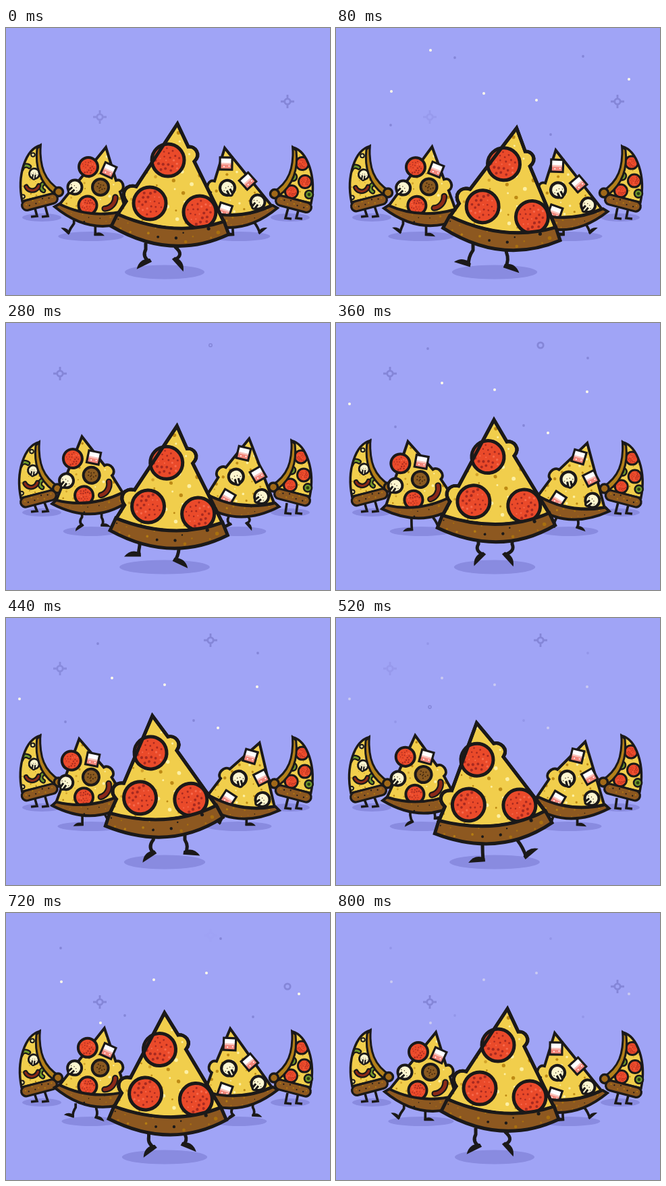
Recreate the animation shown at these times as an HTML page with a canvas. Size 480 by 396 pixels, loop 840 ms.

```html
<!DOCTYPE html>
<html lang="en">
<head>
<meta charset="utf-8">
<title>Pizza dance</title>
<style>
html, body { margin: 0; width: 100%; height: 100%; overflow: hidden; background: #a0a4f6; }
canvas { display: block; width: 480px; height: 396px; }
</style>
</head>
<body>
<canvas id="stage" width="480" height="396"></canvas>
<script>
const c = document.getElementById('stage').getContext('2d');
const LOOP = 840, STEP = 40, DANCE = 800;
const BG = '#a0a4f6', SHADE = '#898be0', INK = '#1b1919', CHEESE = '#f1ce4c', GOLD = '#bd8a14',
  PALE = '#fdf0a4', CRUST = '#8d5820', RED = '#ea4a2a', DARKRED = '#a82a20', CREAM = '#fdf6d0',
  PEPPER = '#8c2a18', GREEN = '#6f9a2c', VIOLET = '#8486d8';

const wave = (p, peak, period = DANCE) => Math.cos((p - peak) / period * 2 * Math.PI);
const dip = p => (1 - wave(p, 0, 400)) / 2;

function group(draw) {
  c.save();
  draw();
  c.restore();
}

function paint(path, fill, line, ink = INK) {
  const args = path ? [path] : [];
  if (fill) { c.fillStyle = fill; c.fill(...args); }
  if (line) { c.strokeStyle = ink; c.lineWidth = line; c.stroke(...args); }
}

function disc(x, y, r, fill, line) {
  c.beginPath();
  c.arc(x, y, r, 0, 7);
  paint(null, fill, line);
}

function shadow(x, y, rx, ry) {
  c.beginPath();
  c.ellipse(x, y, rx, ry, 0, 0, 7);
  paint(null, SHADE);
}

// Scatter dots evenly over a box, clipped to a path.
function speckle(path, seed, n, [x, y, w, h], size, colors) {
  group(() => {
    c.clip(path);
    for (let i = seed; i < seed + n; i++)
      disc(x + w * (i * .7549 % 1), y + h * (i * .5698 % 1),
        size * (.35 + .65 * (i * .377 % 1) ** 2), colors[i % colors.length]);
  });
}

// ---- toppings ----
function salami([x, y], r, line, seed) {
  disc(x, y, r, RED, line);
  for (let i = 0; i < 22; i++) {
    const a = i * 2.4 + seed, d = (r - line) * Math.sqrt((i + .5) / 22);
    disc(x + d * Math.cos(a), y + d * Math.sin(a),
      r * (.045 + .05 * (i * .377 % 1)), i % 4 ? DARKRED : '#f7694c');
  }
}

function meatball([x, y], r) {
  disc(x, y, r, '#8a5a20', 4);
  for (let i = 0; i < 9; i++) {
    const d = 6.5 * Math.sqrt(i / 8);
    disc(x + d * Math.cos(i * 2.4), y + d * Math.sin(i * 2.4), 1.1, '#4a2c10');
  }
}

function ham([x, y], size, deg) {
  group(() => {
    c.translate(x, y);
    c.rotate(deg * Math.PI / 180);
    const s = size / 2;
    c.fillStyle = '#fff';
    c.fillRect(-s, -s, size, size);
    c.fillStyle = '#f2877c';
    c.fillRect(-s, 0, size, s);
    c.fillStyle = '#f9c3bb';
    c.fillRect(-s, -1, size, 2.5);
    disc(-s / 3, s / 2, 1, '#fff');
    disc(s / 2, s / 2.4, 1, '#fff');
    c.strokeStyle = INK;
    c.lineWidth = 3.2;
    c.strokeRect(-s, -s, size, size);
  });
}

const stem = new Path2D('M-2.5 3 L-2.5 11 Q0 13.5 2.5 11 L2.5 3');
function mushroom([x, y], k, deg) {
  group(() => {
    c.translate(x, y);
    c.rotate(deg * Math.PI / 180);
    c.scale(k, k);
    disc(0, 0, 10.5, CREAM, 4);
    paint(stem, CREAM, 3);
    for (let i = 0; i < 4; i++) disc(-6 + i * 4, i % 3 ? -1 : 1.5, .7, '#3c3020');
  });
}

function olive(x, y, r) {
  disc(x, y, r, GREEN, 2.6);
  disc(x, y, r * .4, '#2c3d12');
}

function arcLine([x, y], r, from, to, width, color) {
  c.lineCap = 'round';
  for (const [w, col] of [[width, INK], [width - 4.5, color]]) {
    c.beginPath();
    c.arc(x, y, r, from, to);
    paint(null, null, w, col);
  }
}

// ---- slices ----
const big = {
  cheese: 'M254 142 L270 176 C280 175 290 187 279 198 L323 288 Q248 312 165 277 L178 257 C169 244 178 231 193 235 Z',
  crust: new Path2D('M165 276 Q248 312 323 287 L330 306 Q245 346 156 294 Z'),
  box: [152, 140, 182, 160], base: [152, 278, 182, 48], foot: 302, tall: 160, line: 5
};
const mid = {
  cheese: 'M148 177 L163 226 C173 223 178 238 169 243 L178 272 Q125 284 79 262 Z',
  crust: new Path2D('M79 261 Q125 284 178 271 L182 286 Q125 309 72 265 Z'),
  box: [78, 177, 100, 105], base: [70, 262, 114, 38], foot: 278, tall: 101, line: 4
};

// The slice leans over more and more towards its tip.
const bend = (s, tip) => (x, y) => [x + tip * ((s.foot - y) / s.tall) ** 2, y];

function slice(s, seed, n, dot, tip) {
  const at = bend(s, tip);
  const cheese = new Path2D(s.cheese.replace(/(\d+) (\d+)/g, (_, x, y) => at(+x, +y).join(' ')));
  paint(cheese, CHEESE);
  speckle(cheese, seed, n, s.box, dot, [GOLD, '#d3a32a', GOLD, PALE]);
  paint(cheese, null, s.line);
  return cheese;
}

function crust(s, seed, dot) {
  paint(s.crust, CRUST);
  speckle(s.crust, seed, 34, s.base, dot, ['#b57d12', INK, '#a9700f']);
  paint(s.crust, null, s.line);
}

function bigTop(tip) {
  const at = bend(big, tip), cheese = slice(big, 42, 90, 3.8, tip);
  salami(at(240, 196), 24, 5, 3);
  salami(at(213, 260), 24, 5, 5);
  group(() => {
    c.clip(cheese);
    salami(at(287, 273), 24, 5, 8);
  });
  paint(cheese, null, 5);
  crust(big, 9, 3);
}

function leftTop(tip) {
  const at = bend(mid, tip);
  slice(mid, 71, 60, 2.6, tip);
  salami(at(122, 206), 14, 4, 2);
  salami(at(121, 263), 13.5, 4, 6);
  meatball(at(140, 236), 12);
  ham(at(152, 211), 18, 24);
  mushroom(at(102, 236), 1, 48);
  arcLine(at(145, 251), 17, 0, 1.5, 9.5, PEPPER);
  crust(mid, 21, 2);
}

function rightTop(tip) {
  const at = bend(mid, tip);
  group(() => {
    c.translate(472, 1);
    c.scale(-1, 1);
    slice(mid, 33, 60, 2.6, -tip);
  });
  ham(at(326, 201), 18, 1);
  ham(at(358, 227), 18, -42);
  ham(at(324, 270), 18, 18);
  mushroom(at(328, 237), 1.05, -28);
  mushroom(at(373, 258), 1, 38);
  group(() => {
    c.translate(474, 2);
    c.scale(-1, 1);
    crust(mid, 63, 2);
  });
}

// Pose of a dancing slice around the middle of its crust.
function pose(p, d) {
  return new DOMMatrix()
    .translate(d.px + d.sway * wave(p, 120), d.py + d.hop * dip(p))
    .rotate(d.tilt * wave(p, 120))
    .translate(-d.px, -d.py);
}

// Right leg: time, hip, knee, ankle (x from the middle), foot angle.
const LEG = [
  [0, 16, 325, 30, 337, 14, 344, 48],
  [120, 18, 336, 18, 348, 17, 360, 4],
  [160, 15, 342, 15, 350, 15, 360, 0],
  [240, 17, 338, 17, 348, 17, 360, 4],
  [280, 21, 336, 20, 346, 15, 353, 25],
  [360, 26, 328, 31, 339, 14, 344, 48],
  [520, 34, 330, 42, 340, 47, 355, -40],
  [560, 36, 332, 44, 342, 50, 356, -42],
  [640, 38, 333, 42, 342, 46, 354, -38],
  [680, 37, 330, 39, 338, 38, 345, 0],
  [760, 24, 328, 30, 338, 16, 344, 45],
  [800, 16, 325, 30, 337, 14, 344, 48]
];
const foot = new Path2D('M-3 1.5 L-2.5 -4 Q12 -11 22 1.5 Z');

function leg(p, side, width) {
  const i = LEG.findIndex(k => k[0] > p), a = LEG[i - 1], b = LEG[i];
  const f = (p - a[0]) / (b[0] - a[0]);
  const [, hx, hy, kx, ky, ax, ay, deg] = a.map((v, j) => v + (b[j] - v) * f);
  group(() => {
    c.scale(side, 1);
    c.beginPath();
    c.moveTo(hx, hy - 10);
    c.lineTo(hx, hy);
    c.quadraticCurveTo(kx, ky, ax, ay);
    c.lineJoin = 'round';
    paint(null, null, width);
    c.translate(ax, ay);
    c.rotate(deg * Math.PI / 180);
    paint(foot, INK);
  });
}

const DANCERS = [
  { top: leftTop, phase: 160, px: 126, py: 278, sway: 0, hop: 11, tilt: 7, tip: 8, x: 123, y: 308, k: .62, sx: 126, rx: 45, dr: 4.5, ry: 7 },
  { top: rightTop, phase: 520, px: 345, py: 278, sway: 0, hop: 11, tilt: 7.8, tip: 12.5, x: 347, y: 308, k: .62, sx: 345, rx: 45, dr: 4.5, ry: 7 },
  { top: bigTop, phase: 0, px: 242.5, py: 302.5, sway: 6, hop: 17, tilt: 5.8, tip: 10, x: 235, y: 361, k: 1, sx: 235, rx: 65, dr: 6, ry: 10.5 }
];
for (const d of DANCERS) d.rest = pose(d.phase, d).inverse();

function dancer(d, t) {
  const p = (t + d.phase) % DANCE, m = pose(p, d).multiply(d.rest);
  group(() => {
    c.translate(d.x, d.y);
    c.scale(d.k, d.k);
    c.translate(0, -361);
    leg(p, 1, d.k < 1 ? 6 : 5);
    leg((p + 400) % DANCE, -1, d.k < 1 ? 6 : 5);
  });
  group(() => {
    c.transform(m.a, m.b, m.c, m.d, m.e, m.f);
    d.top(d.tip * (wave(p, 180) - wave(d.phase, 180)));
  });
}

// ---- thin slices at the sides ----
const face = new Path2D('M51 174 C29 180 16 218 24 257 L74 245 C52 228 46 205 51 174 Z');
const edge = new Path2D('M51 174 C50 205 56 226 81 241 L72 246 C50 230 43 205 46 179 Z');

function thin(dx, dy, toppings, seed) {
  c.lineCap = 'butt';
  for (const [x, lean] of [[42, 4], [58, 4]]) {
    c.beginPath();
    c.moveTo(x + dx, 264);
    c.lineTo(x + lean, 279);
    c.lineTo(x + lean - 9, 280);
    paint(null, null, 3.6);
  }
  c.translate(dx, dy);
  paint(face, CHEESE);
  speckle(face, seed, 36, [18, 175, 55, 75], 1.8, [GOLD, GOLD, PALE]);
  group(() => {
    c.clip(face);
    toppings();
  });
  paint(face, null, 3.5);
  paint(edge, '#b3801a', 3);
  disc(78, 243, 6.5, '#a06818', 3.5);
  c.lineCap = 'round';
  for (const [w, col] of [[18, INK], [11.5, CRUST]]) {
    c.beginPath();
    c.moveTo(31, 263);
    c.lineTo(69, 253);
    paint(null, null, w, col);
  }
  for (let i = 0; i < 9; i++)
    disc(30 + i * 4.8, 262 - i * 1.2 + 3.4 * Math.sin(i * 2.3), 1.1, i % 2 ? INK : '#b57d12');
}

function veggies() {
  disc(40, 188, 2.8, PALE, 2);
  disc(25, 250, 2.8, PALE, 2);
  arcLine([30, 211], 7, 3.4, 5.4, 7.5, GREEN);
  arcLine([58, 236], 6, 2, 4.2, 7.5, GREEN);
  mushroom([42, 216], .72, 8);
  arcLine([39, 231], 10, .3, 2.7, 7.5, PEPPER);
}

function salamis() {
  salami([37, 198], 9.5, 3, 2);
  salami([33, 225], 9.5, 3, 4);
  salami([53, 240], 9.5, 3, 9);
  olive(51, 218, 6);
}

function sides(t) {
  const k = dip(t % DANCE);
  group(() => thin(-3 * k, 4 * k, veggies, 91));
  group(() => {
    c.translate(476, 3);
    c.scale(-1, 1);
    thin(3 * k, -4 * k, salamis, 57);
    olive(27, 244, 6);
  });
}

// ---- sky ----
const STARS = [[80, 75, 115], [303, 33, 265], [139, 132, 508], [417, 109, 625]];
const LIGHT_DOTS = [[140, 33], [82, 94], [219, 97], [297, 107], [434, 76]];
const DARK_DOTS = [[176, 44], [366, 42], [81, 144], [318, 158]];

function star(x, y, age) {
  if (age > 460) return;
  c.globalAlpha = Math.min(1, (460 - age) / 160);
  c.beginPath();
  c.arc(x, y, Math.min(4.2, 1.4 + age * .055), 0, 7);
  const arm = Math.min(10, 4 + (age - 95) * .13);
  if (age > 100)
    for (const [u, v] of [[1, 0], [-1, 0], [0, 1], [0, -1]]) {
      c.moveTo(x + 4 * u, y + 4 * v);
      c.lineTo(x + arm * u, y + arm * v);
    }
  paint(null, null, age < 30 ? 1.5 : 2.8, VIOLET);
}

// One dot pattern, flipped for each third of the loop.
function dots(t) {
  const turn = Math.floor(t / 280), age = t % 280;
  c.globalAlpha = Math.max(0, Math.min(1, age / 60, 1 - (age - 160) / 145));
  const at = ([x, y], r, fill) =>
    disc(turn === 1 ? 454 - x : x, turn ? 196 - y : y, r, fill);
  LIGHT_DOTS.forEach(d => at(d, 2, '#fffbea'));
  DARK_DOTS.forEach(d => at(d, 1.9, VIOLET));
}

function sky(t) {
  group(() => {
    c.lineCap = 'butt';
    for (const [x, y, start] of STARS) star(x, y, (t - start + LOOP) % LOOP);
    dots(t);
  });
}

function draw(t) {
  c.fillStyle = BG;
  c.fillRect(0, 0, 480, 396);
  sky(t);
  shadow(53, 281, 29, 6);
  shadow(421, 281, 29, 6);
  for (const d of DANCERS)
    shadow(d.sx, d.y + 1, d.rx - d.dr * wave(t + d.phase, 0, 400), d.ry);
  sides(t);
  for (const d of DANCERS) dancer(d, t);
}

const begin = performance.now();
function tick() {
  const t = (performance.now() - begin) % LOOP;
  draw(Math.floor(t / STEP) * STEP);
  requestAnimationFrame(tick);
}
tick();
</script>
</body>
</html>
```
